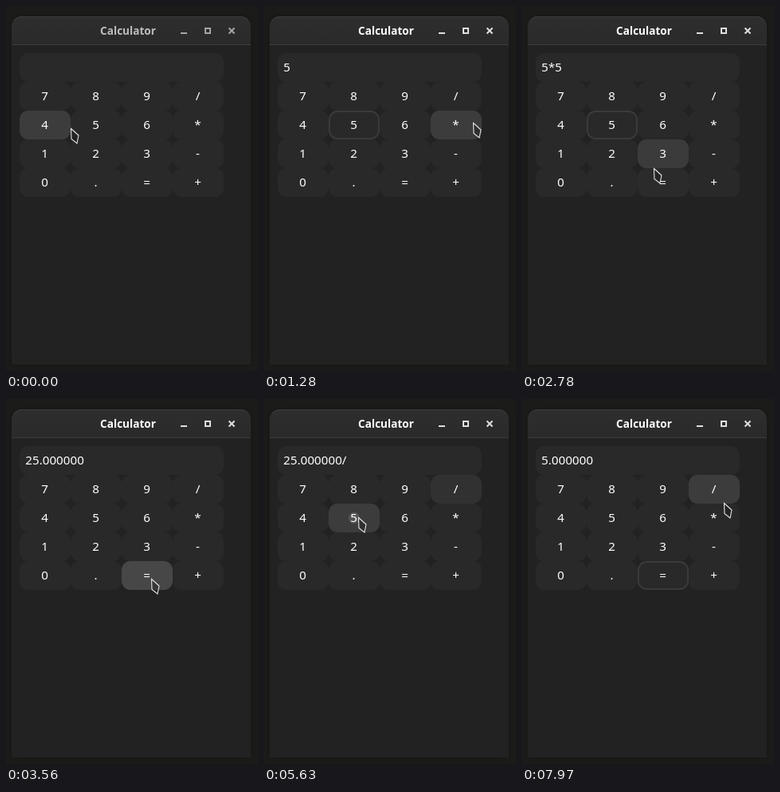
An HTML page with a canvas for the animation above (8000 ms loop, 316 px wide and 457 px high).

```html
<!DOCTYPE html>
<html lang="en">
<head>
<meta charset="utf-8">
<title>Calculator</title>
<style>
html, body { margin: 0; width: 100%; height: 100%; overflow: hidden; background: #1b1c19; }
canvas { display: block; }
</style>
</head>
<body>
<canvas id="stage" width="316" height="457"></canvas>
<script>
const ctx = document.getElementById('stage').getContext('2d');
const LOOP = 8000, W = 64, H = 36, RADIUS = 11;
const FONT = '"Noto Sans", "Open Sans", sans-serif';

// Pointer moves: start, end, x, y
const home = [80.5, 153];
const moves = [
  [70, 500, 112, 150], [620, 1280, 262, 146], [1600, 2120, 117, 141],
  [2380, 3200, 182, 225], [3730, 4020, 258, 153], [4250, 4500, 245, 110],
  [4880, 5440, 118, 148], [5910, 6370, 199, 217], [6470, 6600, 191, 213],
  [7030, 7800, 253, 130]
];

const clicks = [
  { label: '5', down: 320, up: 480 }, { label: '*', down: 1350, up: 1440 },
  { label: '5', down: 2080, up: 2220 }, { label: '=', down: 3180, up: 3330 },
  { label: '/', down: 4550, up: 4810 }, { label: '5', down: 5600, up: 5760 },
  { label: '=', down: 6470, up: 6560 }
];

const keys = [...'789/456*123-0.=+'].map((label, i) =>
  ({ label, x: 17 + i % 4 * W, y: 95 + Math.floor(i / 4) * H }));

const clamp = v => Math.max(0, Math.min(1, v));
const easeOut = k => 1 - (1 - k) ** 2;
const white = a => `rgba(255,255,255,${a})`;

function pointer(t) {
  return moves.reduce(([px, py], [from, to, x, y]) => {
    const k = easeOut(clamp((t - from) / (to - from)));
    return [px + (x - px) * k, py + (y - py) * k];
  }, home);
}

function isOver(key, t) {
  const [x, y] = pointer(t);
  return x >= key.x && x < key.x + W && y >= key.y && y < key.y + H;
}

// Hover fades in and out over 100 ms
function hoverAmount(key, t) {
  let sum = 0;
  for (let i = 0; i < 10; i++) sum += isOver(key, t - i * 10);
  return sum / 10;
}

function displayText(t) {
  return clicks.filter(c => c.up <= t).reduce((text, { label }) => {
    if (label !== '=') return text + label;
    const [, a, op, b] = text.match(/(.+)([*\/])(.+)/);
    return (op === '*' ? a * b : a / b).toFixed(6);
  }, '');
}

function roundRect(x, y, w, h, r) {
  ctx.beginPath();
  ctx.roundRect(x, y, w, h, r);
}

function fill(style) {
  ctx.fillStyle = style;
  ctx.fill();
}

function text(str, x, y, font, color, align) {
  ctx.font = `${font} ${FONT}`;
  ctx.textAlign = align;
  ctx.fillStyle = color;
  ctx.fillText(str, x, y);
}

function drawWindow(active) {
  ctx.fillStyle = '#1b1c19';
  ctx.fillRect(0, 0, 316, 457);
  ctx.save();
  ctx.shadowColor = 'rgba(0,0,0,.25)';
  ctx.shadowBlur = 6;
  roundRect(7, 13, 300, 436, [13, 13, 0, 0]);
  fill('#222222');
  ctx.restore();

  const header = ctx.createLinearGradient(0, 13, 0, 48);
  header.addColorStop(0, '#2e2e2e');
  header.addColorStop(1, '#2a2a2a');
  roundRect(7, 13, 300, 35, [13, 13, 0, 0]);
  fill(header);
  ctx.lineWidth = 1;
  ctx.strokeStyle = '#3d3d3d';
  ctx.beginPath();
  ctx.arc(20, 26.5, 13, -Math.PI * .8, -Math.PI / 2);
  ctx.arc(294, 26.5, 13, -Math.PI / 2, -Math.PI * .2);
  ctx.stroke();
  ctx.fillStyle = '#3c3c3c';
  ctx.fillRect(7, 48, 300, 1);

  text('Calculator', 153, 36, 'bold 13.6px', active ? '#ffffff' : '#bdbdbd', 'center');
  ctx.fillStyle = ctx.strokeStyle = active ? '#dedede' : '#a4a4a4';
  ctx.fillRect(219, 33, 8, 2);
  ctx.lineWidth = 2;
  ctx.strokeRect(250, 28, 6, 6);
  ctx.beginPath();
  ctx.moveTo(279.5, 27.5); ctx.lineTo(286.5, 34.5);
  ctx.moveTo(286.5, 27.5); ctx.lineTo(279.5, 34.5);
  ctx.stroke();
}

function drawKey(key, t, focus) {
  const { label, x, y } = key, hover = hoverAmount(key, t);
  const focused = focus?.label === label;
  ctx.save();
  roundRect(x, y, W, H, RADIUS);
  fill('#292929');
  fill(white(.09 * hover));
  if (focused) fill(white(.06 * hover * clamp((t - focus.up) / 100)));
  ctx.clip();
  clicks.forEach((click, i) => {
    if (click.label !== label || t < click.down) return;
    const fade = 1 - clamp((t - click.up) / 200);
    ctx.beginPath();
    ctx.arc(x + W / 2, y + H / 2, Math.min(38, (t - click.down) * .23), 0, 7);
    fill(white(.12 * fade));
    // Brief afterglow when focus moves on
    const lost = clicks[i + 1]?.down;
    if (t >= lost) {
      roundRect(x, y, W, H, RADIUS);
      fill(white(.05 * (1 - clamp((t - lost) / 120))));
    }
  });
  ctx.restore();
  if (focused && hover < 1) {
    roundRect(x + 1, y + 1, W - 2, H - 2, RADIUS - 1);
    ctx.lineWidth = 2;
    ctx.strokeStyle = white(.08 * (1 - hover));
    ctx.stroke();
  }
  text(label, x + W / 2 - .5, y + 23, '500 15.2px', '#ffffff', 'center');
}

function drawPointer(t) {
  const [x, y] = pointer(t).map(Math.round);
  ctx.save();
  ctx.translate(x + .5, y + .5);
  ctx.beginPath();
  ctx.moveTo(0, 0);
  ctx.lineTo(9.5, 8.5);
  ctx.lineTo(7.5, 18.5);
  ctx.lineTo(.5, 13);
  ctx.closePath();
  fill('rgba(30,30,30,.4)');
  ctx.lineWidth = 1.1;
  ctx.strokeStyle = '#e4e4e4';
  ctx.stroke();
  ctx.restore();
}

function draw(t) {
  const focus = clicks.filter(c => c.down <= t).pop();
  drawWindow(!!focus);
  roundRect(17, 59, 256, H, RADIUS);
  fill('#292929');
  text(displayText(t), 24.3, 82, '15.2px', '#ffffff', 'left');
  for (const key of keys) drawKey(key, t, focus);
  drawPointer(t);
}

const start = performance.now();
function loop() {
  draw((performance.now() - start) % LOOP);
  requestAnimationFrame(loop);
}
loop();
</script>
</body>
</html>
```
